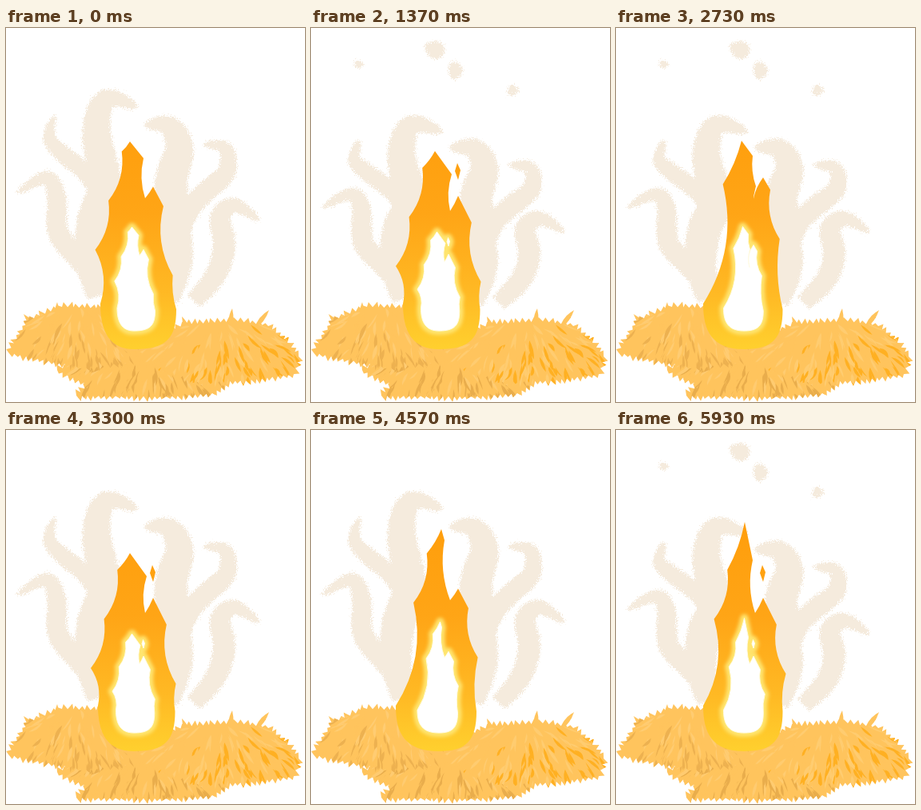
Recreate the animation shown at these times as an HTML page. Size 374x468 px, loop 6000 ms.

```html
<!DOCTYPE html>
<html lang="en">
<head>
<meta charset="utf-8">
<title>Smoking fire on straw</title>
<style>
html, body { margin: 0; width: 100%; height: 100%; overflow: hidden; background: #fff; }
svg { display: block; width: 374px; height: 468px; }
</style>
</head>
<body>
<svg viewBox="0 0 374 468">
  <defs>
    <linearGradient id="heat" gradientUnits="userSpaceOnUse" x1="0" y1="120" x2="0" y2="402">
      <stop offset="0" stop-color="#ff9e0c"/>
      <stop offset=".4" stop-color="#ffa516"/>
      <stop offset=".75" stop-color="#ffb924"/>
      <stop offset="1" stop-color="#ffd02e"/>
    </linearGradient>
    <filter id="rough" color-interpolation-filters="sRGB">
      <feTurbulence type="fractalNoise" baseFrequency=".7" numOctaves="2" seed="4"/>
      <feDisplacementMap in="SourceGraphic" scale="12" xChannelSelector="R" yChannelSelector="G"/>
    </filter>
    <filter id="glow" x="-60%" y="-40%" width="220%" height="180%">
      <feGaussianBlur stdDeviation="4"/>
    </filter>
    <path id="flame"/>
    <clipPath id="body"><use href="#flame"/></clipPath>
  </defs>
  <path id="smoke" fill="#f5ebdd" filter="url(#rough)"/>
  <g id="straw"></g>
  <use href="#flame" fill="url(#heat)"/>
  <g clip-path="url(#body)">
    <!-- the white core is the same flame at half size -->
    <g transform="matrix(.5 0 0 .5 80 178)">
      <use href="#flame" fill="#fff3a0" stroke="#ffe570" stroke-width="20" stroke-linejoin="round" filter="url(#glow)"/>
      <use href="#flame" fill="#fff" stroke="#fffbe4" stroke-width="2"/>
    </g>
  </g>
</svg>
<script>
const $ = id => document.getElementById(id);
const TAU = 2 * Math.PI;

// --- Smoke: plumes grow from the ground, then lift off, break and thin out ---
const plumes = [
  { width: 21, life: 4, big: true, spine: [[118, 335], [106, 290], [110, 240], [124, 195], [113, 130], [126, 88], [166, 100]] },
  { width: 21, life: 4, big: true, spine: [[200, 340], [214, 290], [208, 235], [207, 190], [217, 150], [203, 122], [172, 122]] },
  { width: 11, life: 4, spine: [[110, 200], [98, 180], [72, 158], [54, 138], [61, 109]] },
  { width: 13, life: 3, spine: [[114, 320], [88, 287], [65, 255], [63, 210], [50, 187], [13, 207]] },
  { width: 13, life: 4, spine: [[205, 310], [226, 235], [250, 205], [276, 180], [274, 150], [246, 146]] },
  { width: 14, life: 3, spine: [[235, 342], [263, 308], [273, 272], [268, 236], [287, 222], [318, 242]] }
];

// Catmull-Rom point at u in 0..1
function along(pts, u) {
  const last = pts.length - 1, i = Math.min(last - 1, Math.floor(u * last)), t = u * last - i;
  const p = n => pts[Math.max(0, Math.min(last, n))];
  return [0, 1].map(c => {
    const a = p(i - 1)[c], b = p(i)[c], d = p(i + 1)[c], e = p(i + 2)[c];
    return b + t * (d - a + t * (2 * a - 5 * b + 4 * d - e + t * (3 * (b - d) + e - a))) / 2;
  });
}

// Tapered ribbon over part of a spine
function ribbon({ spine, width }, from, to, scale, moveY) {
  const left = [], right = [], steps = 24, root = from ? 0 : .25;
  const point = u => {
    const [x, y] = along(spine, Math.max(0, Math.min(1, u)));
    return [x, moveY(y)];
  };
  for (let i = 0; i <= steps; i++) {
    const t = i / steps, u = from + (to - from) * t;
    const [x, y] = point(u), a = point(u - .01), b = point(u + .01);
    const dir = Math.atan2(b[1] - a[1], b[0] - a[0]);
    const w = width * scale * Math.max(0, Math.sin(Math.PI * (root + (1 - root) * t) ** 1.1)) ** .6;
    left.push([x - w * Math.sin(dir), y + w * Math.cos(dir)]);
    right.unshift([x + w * Math.sin(dir), y - w * Math.cos(dir)]);
  }
  return 'M' + left.concat(right).map(p => p.map(v => v.toFixed(1))).join('L') + 'Z';
}

function smoke(k) {
  const lift = y => y - 17 * k, grown = .08 + .2 * k;
  const squash = y => 360 - (360 - y) * grown;
  return plumes.map(p => {
    if (!k) return ribbon(p, 0, 1, 1, lift);
    let d = ribbon(p, 0, Math.min(1, grown + .12), 1, squash);
    if (k <= p.life) d += ribbon(p, .42 + .12 * k, 1, 1 - .03 * k * k, lift);
    if (p.big && k < 3) d += ribbon(p, .12 + .08 * k, .52, .75, lift);
    return d;
  }).join('');
}

// --- Flame: kinks climb both sides; a side tongue rises and sheds a spark ---
const tips = [[155, 142], [157, 127], [161, 115], [163, 124], [157, 141], [155, 154]];
const shoulders = [[172, 163], [168, 142], [171, 163], [167, 138], [171, 160], [176, 183]];
const valleys = [213, 243, 229];
const RISE = 20.5, GAP = 3 * RISE;

function flame(k) {
  const sway = Math.cos(k * TAU / 6), climb = (k + 1) % 3;
  const tip = tips[k], peak = [184, 210 - 11.5 * climb];
  const baseL = 112 + 6 * sway, baseR = 210 + 3 * sway;
  const kinks = (bottom, top, x) => {
    const list = [];
    for (let y = bottom - RISE * climb; y > top; y -= GAP) list.push([x(y), y]);
    return list;
  };
  const right = kinks(305, peak[1] + 8, y => 192 + (y - 197) * .19).reverse();
  const lowest = right[right.length - 1];
  lowest[1] += 25 * Math.max(0, sway);
  const left = kinks(sway > 0 ? 298 : 298 - GAP, tip[1] + 8, y => 106 + (298 - y) * .27);

  let pen = tip, d = `M${tip}`;
  // concave edge: the control point bows toward the inside
  const edge = (to, bow = .2) => {
    const dx = to[0] - pen[0], dy = to[1] - pen[1];
    d += `Q${(pen[0] + to[0]) / 2 - dy * bow},${(pen[1] + to[1]) / 2 + dx * bow} ${to}`;
    pen = to;
  };
  edge(shoulders[k], 0);
  if (k % 3 === 1) edge([175, 198], .12);
  edge([174, valleys[k % 3]], .14);
  edge(peak, k % 3 === 1 ? -.25 : .05);
  right.forEach((p, i) => edge(p, i ? .2 : 0));
  edge([baseR, 352], .1);
  d += `C${baseR},388 ${baseR - 12},402 160,402C${baseL + 12},402 ${baseL},380 ${baseL},345`;
  pen = [baseL, 345];
  left.forEach(p => edge(p, .21));
  edge(tip, .08);
  return d + 'Z' + (k % 3 === 2 ? 'M183,169L187,178L184,190L180,179Z' : '');
}

// --- Straw: three heaps with ragged rims, thatched downward ---
let seed = 7;
const rand = (a, b) => a + (b - a) * ((seed = seed * 16807 % 2147483647) / 2147483647);
const heaps = [
  { rim: [[64, 428], [120, 410], [250, 420], [280, 443], [258, 457], [200, 461], [88, 460], [104, 447]],
    cx: 175, cy: 432, rx: 95, ry: 32, tilt: 0, dark: '#e9ad4c', light: '#ffcb70', tufts: [] },
  { rim: [[3, 406], [28, 366], [70, 349], [120, 351], [200, 390], [190, 412], [100, 425], [40, 414]],
    cx: 90, cy: 388, rx: 92, ry: 38, tilt: 0, dark: '#edb150', light: '#ffcc72', tufts: [[64, 343], [22, 358]] },
  { rim: [[172, 392], [225, 371], [290, 367], [328, 373], [352, 394], [366, 411], [360, 433], [300, 441], [240, 443], [170, 415]],
    cx: 270, cy: 404, rx: 98, ry: 38, tilt: .35, dark: '#ffb022', light: '#ffcc70', tufts: [[220, 361], [283, 351], [329, 353]] }
];

function ragged(rim) {
  return rim.flatMap(([x, y], i) => {
    const [x2, y2] = rim[(i + 1) % rim.length], dx = x2 - x, dy = y2 - y;
    const length = Math.hypot(dx, dy), n = Math.round(length / 7), teeth = [];
    for (let j = 0; j < n; j++) {
      const t = j / n, s = t + rand(.2, .8) / n, out = rand(3, 7) / length;
      teeth.push([x + dx * t, y + dy * t], [x + dx * s + dy * out, y + dy * s - dx * out]);
    }
    return teeth;
  }).map(p => p.map(v => v.toFixed(1))).join(' ');
}

function blade(x, y, angle, length, width, fill) {
  const c = Math.cos(angle), s = Math.sin(angle), bend = rand(-3, 3);
  const mx = x + c * length / 2 - s * bend, my = y + s * length / 2 + c * bend;
  return `<path fill="${fill}" d="M${x},${y}Q${mx - s * width},${my + c * width} ${x + c * length},${y + s * length}Q${mx + s * width},${my - c * width} ${x},${y}"/>`;
}

function heap({ rim, cx, cy, rx, ry, tilt, dark, light, tufts }, id) {
  const outline = ragged(rim), base = '#ffc45d';
  let out = `<clipPath id="heap${id}"><polygon points="${outline}"/></clipPath><polygon points="${outline}" fill="${base}"/>`;
  for (const [x, y] of tufts) out += blade(x, y, Math.atan2(cy - y, cx - x) + (x < cx ? .5 : -.2), 30, 6, base);
  out += `<g clip-path="url(#heap${id})">`;
  for (let i = 0; i < 150; i++) {
    const a = rand(0, TAU), r = Math.sqrt(rand(0, 1));
    const dx = r * Math.cos(a), dy = r * Math.sin(a);
    const shade = .35 + .4 * dy + tilt * dx;
    out += blade(cx + rx * dx, cy + ry * dy, Math.atan2(dy + 1.1, dx * 1.6) + rand(-.35, .35),
      rand(12, 26), rand(1.5, 5), rand(0, 1) < shade ? dark : rand(0, 1) < .5 ? light : base);
  }
  return out + '</g>';
}
$('straw').innerHTML = heaps.map(heap).join('');

// --- Playback: 30 pictures a second; smoke holds 300 ms, flame 80 ms ---
function draw(now) {
  const tick = Math.max(0, Math.floor(now % 6000 * .03 + .1) - .01);
  $('smoke').setAttribute('d', smoke(Math.floor(tick / 9) % 5));
  $('flame').setAttribute('d', flame(Math.floor(tick / 2.4) % 6));
}

const start = performance.now();
function loop() {
  draw(performance.now() - start);
  requestAnimationFrame(loop);
}
loop();
</script>
</body>
</html>
```
